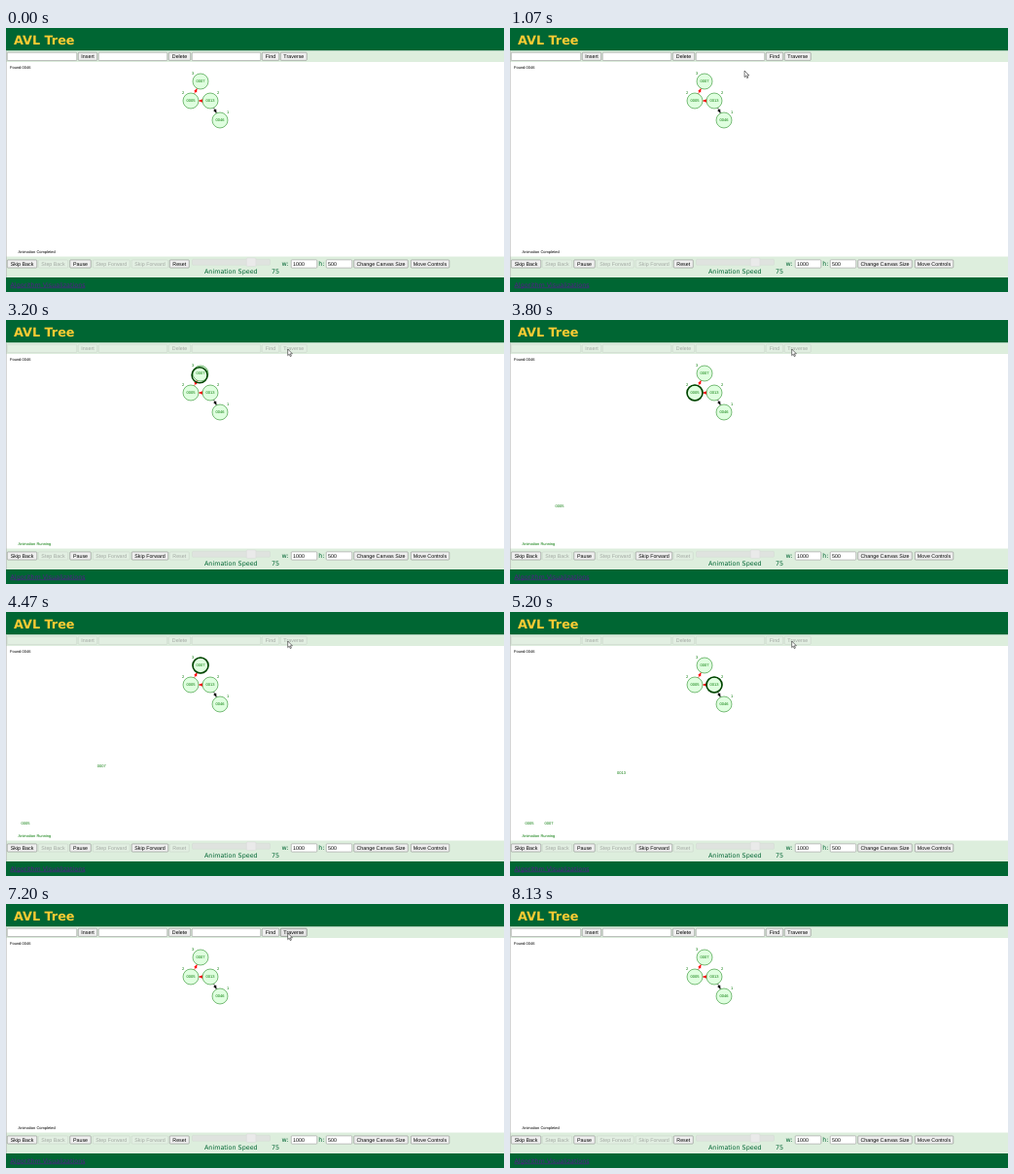
These frames come from a looping animation (512x272 px, 9.34 s). An HTML page:

```html
<!DOCTYPE html>
<html lang="en">
<head>
<meta charset="utf-8">
<title>AVL Tree</title>
<style>
html, body { margin: 0; width: 100%; height: 100%; overflow: hidden; background: #fff; }
svg { display: block; width: 512px; height: 272px; text-rendering: geometricPrecision; }
text { font-family: "Liberation Sans", Arial, sans-serif; font-kerning: none; }
.page { font: 6.4px "DejaVu Sans", Verdana, sans-serif; fill: #063; }
.title { font: bold 12.8px "DejaVu Sans", Verdana, sans-serif; fill: #fc3; }
.link { fill: #551a8b; text-decoration: underline; }
.small { font-size: 4px; }
.mid { text-anchor: middle; }
.green { fill: #070; }
.node { fill: #dfffdf; stroke: #070; stroke-width: .5; }
.ring { fill: none; stroke: #040; stroke-width: 1.6; }
.btn rect { fill: #efefef; stroke: #767676; stroke-width: .5; }
.btn text { font-size: 5.33px; text-anchor: middle; fill: #000; }
.field rect { fill: #fff; stroke: #858585; stroke-width: .5; }
.field text { font-size: 5.33px; fill: #000; }
.off rect, .running .idle rect, .ready .busy rect { fill: #e2efe2; stroke: #c6cec6; }
.off text, .running .idle text, .ready .busy text { fill: #a2a8a2; }
.ready .hover rect { fill: #e5e5e5; stroke: #4f4f4f; }
.ready .press rect { fill: #f5f5f5; stroke: #8d8d8d; }
.running .done, .ready .run { display: none; }
</style>
</head>
<body>
<svg id="stage" class="ready" viewBox="0 0 512 272"></svg>
<script>
const LOOP = 9340, TICK = 1000 / 15;
// Each block of the tree animation is 12 ticks long; moves finish after 11.
const STEP = 30.5, BLOCK = 12 * STEP, START = 2778, CLEAR = 6795, END = 7190;

const stage = document.getElementById('stage');
const root = [200, 55], left = [190, 75], right = [210, 75], leaf = [220, 95];
const nodes = [[root, '0007', 3, -8], [left, '0005', 2, -8], [right, '0013', 2, 8], [leaf, '0046', 1, 8]];

// Ring position at the end of every block.
const ringStops = [root, left, left, root, root, right, right, leaf, leaf, right, root];
const prints = [
  { word: '0005', from: left, block: 2 },
  { word: '0007', from: root, block: 4 },
  { word: '0013', from: right, block: 6 },
  { word: '0046', from: leaf, block: 8 }
];

// Pointer path: time, x, y.
const pathIn = [
  [67, 508, 268], [1000, 260.5, 51.5], [1067, 241, 44], [1134, 235.5, 41.5], [1200, 234.5, 41],
  [1400, 242, 39], [1650, 268, 34], [1850, 283, 31.5], [2000, 287, 31], [2200, 288, 31], [2400, 289.7, 30]
];
const pathOut = [[7530, 289.7, 30], [7600, 281, 39], [7800, 205, 108], [8067, 32, 260]];

const text = (x, y, s, cls) => `<text x="${x}" y="${y}" class="${cls}">${s}</text>`;
const rect = (x, y, w, h, fill, more = '') =>
  `<rect x="${x}" y="${y}" width="${w}" height="${h}" fill="${fill}" ${more}/>`;
const box = (x, y, w, h) => rect(x + .25, y + .25, w - .5, h - .5, '', 'rx=".8"');

function button(x, y, w, label, cls = '', id = '') {
  return `<g class="btn ${cls}" id="${id}">${box(x, y, w, 8.6)}${text(x + w / 2, y + 6.1, label, '')}</g>`;
}
function field(x, y, w, value = '', cls = '') {
  return `<g class="field ${cls}">${box(x, y, w, 8.8)}${text(x + 2, y + 6.2, value, '')}</g>`;
}
function arrow([ax, ay], [bx, by], color) {
  const len = Math.hypot(bx - ax, by - ay), deg = Math.atan2(by - ay, bx - ax) * 180 / Math.PI;
  const tip = len - 8;
  return `<g transform="translate(${ax} ${ay}) rotate(${deg})" fill="${color}" stroke="none">
    <path d="M8 0H${tip}" stroke="${color}" stroke-width=".6"/>
    <path d="M${tip} 0l-4 -1.7v3.4z"/></g>`;
}
function node([[x, y], word, height, side]) {
  return `<circle class="node" cx="${x}" cy="${y}" r="8"/>` +
    text(x, y + 1.4, word, 'small mid green') + text(x + side, y - 7, height, 'small mid green');
}

stage.innerHTML =
  rect(0, 0, 512, 272, '#fff') +
  rect(0, 0, 512, 23.5, '#063') + text(8, 17, 'AVL Tree', 'title') +
  rect(0, 23.5, 512, 11.5, '#ded') +
  field(1, 25, 72, '', 'idle') + button(74, 25, 20, 'Insert', 'idle') +
  field(95, 25, 71, '', 'idle') + button(167, 25, 23, 'Delete', 'idle') +
  field(191, 25, 71, '', 'idle') + button(263, 25, 18, 'Find', 'idle') +
  button(282, 25, 27.5, 'Traverse', 'idle', 'traverse') +
  text(4, 42, 'Found:0046', 'small') +
  text(12.5, 231.6, 'Animation Completed', 'small done') +
  text(12.5, 231.6, 'Animation Running', 'small green run') +
  rect(0, 235.5, 512, 21.5, '#ded') +
  button(1, 238.7, 31, 'Skip Back') + button(33, 238.7, 31, 'Step Back', 'off') +
  button(65.5, 238.7, 22, 'Pause') + button(89, 238.7, 38.5, 'Step Forward', 'off') +
  button(129, 238.7, 38, 'Skip Forward', 'busy') + button(168, 238.7, 20.5, 'Reset', 'idle') +
  rect(191.5, 238.3, 80, 6, '#dfe3df', 'stroke="#d0d5d0" stroke-width=".4" rx="1"') +
  rect(247.3, 236.9, 9.6, 8.6, '#eaeaea', 'stroke="#d3d3d3" stroke-width=".4" rx="1"') +
  text(204, 253, 'Animation Speed', 'page') + text(273, 253, '75', 'page') +
  text(283.6, 245, 'w:', 'page') + field(293, 238.6, 27, '1000') +
  text(321.3, 245, 'h:', 'page') + field(329, 238.6, 27, '500') +
  button(357.5, 238.7, 56, 'Change Canvas Size') + button(416, 238.7, 40, 'Move Controls') +
  rect(0, 257, 512, 15, '#063') + text(4.5, 266.5, 'Algorithm Visualizations', 'page link') +
  rect(0, 23.5, .5, 233.5, '#aaa') +
  arrow(left, root, '#f00') + arrow(right, left, '#f00') + arrow(right, leaf, '#000') +
  nodes.map(node).join('') +
  prints.map(p => text(0, 1.4, p.word, 'small mid green print')).join('') +
  '<circle id="ring" class="ring" r="8"/>' +
  '<path id="pointer" d="M0 0V6.6L1.5 5.2 2.6 7.6 3.7 7.1 2.6 4.8H4.7Z" fill="#fff" stroke="#222" stroke-width=".6"/>';

const ring = document.getElementById('ring');
const pointer = document.getElementById('pointer');
const traverse = document.getElementById('traverse');
const labels = [...document.querySelectorAll('.print')];

const mix = (a, b, f) => [a[0] + (b[0] - a[0]) * f, a[1] + (b[1] - a[1]) * f];

function place(el, pos) {
  el.style.display = pos ? '' : 'none';
  if (pos) el.setAttribute('transform', `translate(${pos[0]} ${pos[1]})`);
}

// Progress of a block, in elevenths.
function progress(t, block) {
  const n = Math.floor((t - START - block * BLOCK) / STEP);
  return Math.max(0, Math.min(n, 11)) / 11;
}

function along(path, t) {
  const next = path.findIndex(p => p[0] > t);
  if (next < 0) return path[path.length - 1].slice(1);
  const a = path[next - 1], b = path[next];
  return mix(a.slice(1), b.slice(1), (t - a[0]) / (b[0] - a[0]));
}

function pointerAt(t) {
  if (t < 66 || t > 8100) return null;
  return t < 7540 ? along(pathIn, Math.max(t, 67)) : along(pathOut, t);
}

function ringAt(t) {
  if (t < START || t > CLEAR) return null;
  const i = Math.min(Math.floor((t - START) / BLOCK), ringStops.length - 1);
  return mix(ringStops[Math.max(i - 1, 0)], ringStops[i], progress(t, i));
}

function draw(time) {
  const t = Math.floor((time % LOOP + 3.4) / TICK) * TICK;
  const running = t >= START && t < END;
  stage.setAttribute('class', running ? 'running' : 'ready');

  const p = pointerAt(t);
  place(pointer, p);
  const over = p && p[0] > 282 && p[0] < 309.5 && p[1] > 25 && p[1] < 34;
  traverse.classList.toggle('hover', !!over);
  traverse.classList.toggle('press', t > 2660 && t < START);

  place(ring, ringAt(t));
  prints.forEach(({ from, block }, i) => {
    const shown = running && t >= START + block * BLOCK;
    place(labels[i], shown ? mix(from, [20 + 20 * i, 218], progress(t, block)) : null);
  });
}

const begin = performance.now();
function loop() {
  draw(performance.now() - begin);
  requestAnimationFrame(loop);
}
loop();
</script>
</body>
</html>
```
